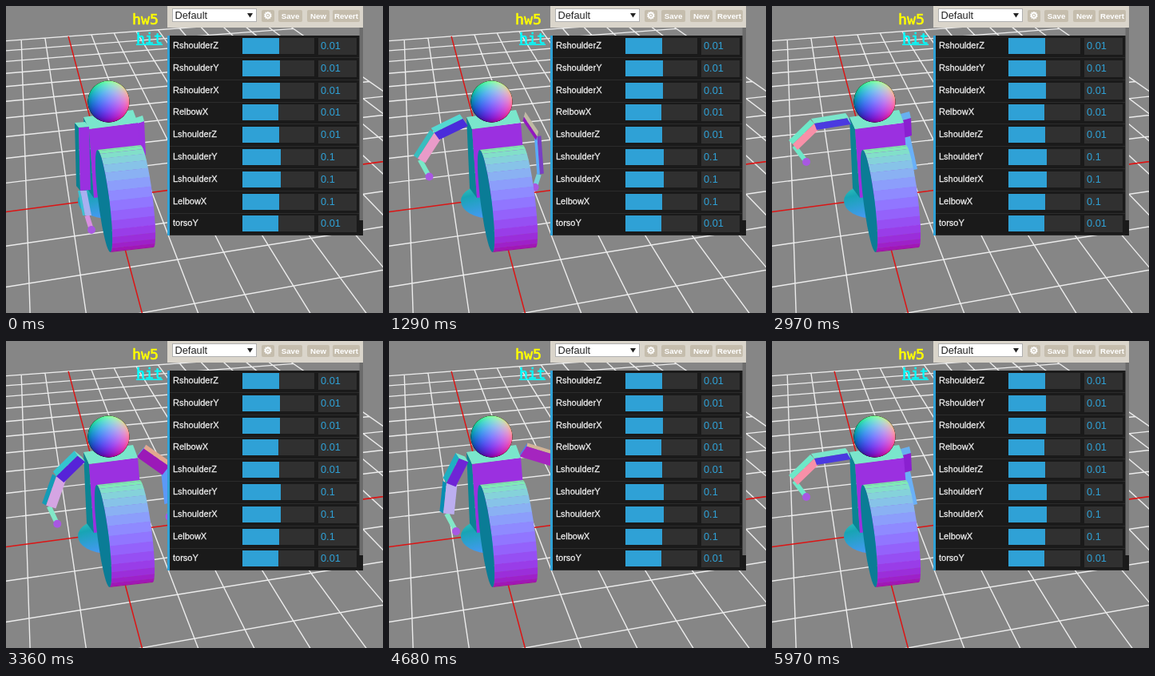
Animation, 472 px wide and 384 px high, one loop 6.33 s. Source, as an HTML page:

```html
<!DOCTYPE html>
<html lang="en">
<head>
<meta charset="utf-8">
<title>Robot controls</title>
<style>
html, body { margin: 0; width: 100%; height: 100%; overflow: hidden; background: #868686; }
svg { display: block; width: 472px; height: 384px; }
text { font-family: "Liberation Sans", sans-serif; }
.mono { font-family: "DejaVu Sans Mono", monospace; font-size: 18.3px; stroke-width: .6px; }
.head { isolation: isolate; }
.head circle { mix-blend-mode: screen; }
</style>
</head>
<body>
<svg id="stage" viewBox="0 0 472 384">
  <defs>
    <linearGradient id="r"><stop stop-color="#000"/><stop offset="1" stop-color="#f00"/></linearGradient>
    <linearGradient id="g" x2="0" y2="1"><stop stop-color="#0f0"/><stop offset="1" stop-color="#000"/></linearGradient>
    <radialGradient id="b">
      <stop stop-color="#00f"/><stop offset=".5" stop-color="#0000ee"/><stop offset=".8" stop-color="#0000cc"/>
      <stop offset=".95" stop-color="#0000a8"/><stop offset="1" stop-color="#000080"/>
    </radialGradient>
    <linearGradient id="hip" x2=".45" y2="1">
      <stop stop-color="#3cd0c0"/><stop offset=".35" stop-color="#18a4b4"/><stop offset="1" stop-color="#4a98fa"/>
    </linearGradient>
  </defs>
  <rect width="472" height="384" fill="#868686"/>
  <g id="grid" fill="none"></g>
  <ellipse cx="128" cy="244" rx="38" ry="22" fill="url(#hip)"/>
  <g id="right"></g>
  <g id="torso">
    <path fill="#0a8494" d="M97 139L104 154L110 240L101 228Z"/>
    <path fill="#9b30e0" d="M104 154L165 146L172 232L110 240Z"/>
    <path fill="#7ae6cc" d="M97 139L159 130L165 146L104 154Z"/>
  </g>
  <g id="shield"></g>
  <g id="left"></g>
  <g class="head">
    <circle cx="128.5" cy="119.500" r="26" fill="url(#r)"/>
    <circle cx="128.5" cy="119.500" r="26" fill="url(#g)"/>
    <circle cx="128.5" cy="119.500" r="26" fill="url(#b)"/>
  </g>
  <text class="mono" x="158" y="22.500" fill="#ff0" stroke="#ff0">hw5</text>
  <text class="mono" x="163" y="46.500" fill="#0ff" stroke="#0ff">hit</text>
  <rect x="163" y="47.500" width="33" height="1.500" fill="#0ff"/>
  <g id="panel"></g>
</svg>
<script>
const el = id => document.getElementById(id);
const LOOP = 6330, STEP = 30;

// Ground plane: u runs away from the viewer, v to the right.
function ground(u, v) {
  const a = 0.0802 * u, b = 0.0151 * v, w = 1 + a + b;
  return [(132 + 11 * a + 3537 * b) / w, (240 - 214 * a - 214 * b) / w].map(n => n.toFixed(1));
}

function drawGrid() {
  const half = 10;
  let white = '', red = '';
  for (let i = -half; i <= half; i++) {
    const row = `M${ground(i, -half)}L${ground(i, half)}`;
    const col = `M${ground(-half, i)}L${ground(half, i)}`;
    if (i) white += row + col; else red = row + col;
  }
  el('grid').innerHTML = `<path d="${white}" stroke="#ececec" stroke-width="1.4"/>` +
    `<path d="${red}" stroke="#dc1414" stroke-width="1.5"/>`;
}

// Short cylinder: a slim tilted end cap and flat shaded strips.
function drawShield() {
  const rim = (deg, dx, dy) => {
    const a = deg * Math.PI / 180;
    return `${(121.5 + dx - 8 * Math.cos(a) + 7 * Math.sin(a)).toFixed(1)},${(244 + dy - 64 * Math.cos(a)).toFixed(1)}`;
  };
  const n = 16, size = 180 / n;
  let out = '', cap = '';
  for (let i = 0; i < n; i++) {
    const p = i * size, q = p + size + 0.4;
    const f = (75 - 150 * i / (n - 1)) * Math.PI / 180;
    const rgb = [125 + 2.5 * i, 128 + 116 * Math.sin(f), 128 + 127 * Math.cos(f)].map(Math.round);
    out += `<polygon fill="rgb(${rgb})" points="${rim(p, 0, 0)} ${rim(p, 54, -6)} ${rim(q, 54, -6)} ${rim(q, 0, 0)}"/>`;
  }
  for (let d = 0; d < 360; d += 10) cap += rim(d, 0, 0) + ' ';
  el('shield').innerHTML = out + `<polygon fill="#0a7c96" points="${cap}"/>`;
}

function drawPanel() {
  const rect = (x, y, w, h, fill, more = '') =>
    `<rect x="${x}" y="${y}" width="${w}" height="${h}" fill="${fill}" ${more}/>`;
  const text = (x, y, size, fill, s, more = '') =>
    `<text x="${x}" y="${y}" font-size="${size}" fill="${fill}" ${more}>${s}</text>`;
  let out = rect(202, 0, 245, 27, '#dad5cb') +
    rect(208.5, 3.5, 105, 16, '#fff', 'stroke="#b0b0b0"') +
    text(211.5, 15.5, 12.8, '#222', 'Default') +
    '<path d="M302 9h7l-3.500 5.500z" fill="#222"/>';
  for (const [x, w, s] of [[320, 16, '⚙'], [341, 30, 'Save'], [377, 28, 'New'], [409, 34, 'Revert']]) {
    const gear = s === '⚙';
    const font = gear ? 'stroke="#fff" stroke-width=".7" style="font-family:\'DejaVu Sans\',sans-serif"' : 'font-weight="bold"';
    out += rect(x, 5, w, 15, '#c5bdad', 'rx="2"') +
      text(x + w / 2, 16, gear ? 12 : 9.7, '#fff', s, 'text-anchor="middle" ' + font);
  }
  out += rect(202, 37, 245, 250, '#1a1a1a') + rect(202, 37, 3, 250, '#2fa1d6') +
    rect(442.5, 27, 4.5, 241, '#6c6c6c');
  const rows = [
    ['RshoulderZ', 46, 0.01], ['RshoulderY', 47, 0.01], ['RshoulderX', 47, 0.01],
    ['RelbowX', 45, 0.01], ['LshoulderZ', 46, 0.01], ['LshoulderY', 48, 0.1],
    ['LshoulderX', 48, 0.1], ['LelbowX', 46, 0.1], ['torsoY', 45, 0.01]
  ];
  rows.forEach(([name, fill, value], i) => {
    const y = 37 + Math.round(i * 27.8);
    out += rect(205, y + 27, 237, 1, '#2c2c2c') +
      text(209, y + 16, 11, '#eee', name, 'stroke="#eee" stroke-width=".3"') +
      rect(296, y + 3, 90, 20, '#303030') + rect(296, y + 3, fill, 20, '#2fa1d6') +
      rect(391, y + 3, 48, 21, '#303030') + text(394, y + 17, 12.8, '#2fa1d6', value);
  });
  el('panel').innerHTML = out;
}

// Pose: shoulder, elbow, wrist, hand, then two side offsets for each limb.
// Colours: upper sides, lower sides, top cap, stick.
const pose = (pts, cols) => ({
  pts, cols: cols.split(' ').map(c => [0, 2, 4].map(i => parseInt(c.slice(i, i + 2), 16)))
});
const arms = {
  left: {
    rest: pose([91, 152, 93, 231, 99, 262, 107, 280, -5, -6, 13, -1, -3, 0, 8, 0],
      '0a8090 9a30e0 40c0d0 a8b0f0 7ae6cc d890e0'),
    keys: [
      pose([87, 152, 85, 184, 92, 220, 113, 241, -5, -8, 13, -2, -4, -3, 13, -2],
        '1590a8 9a30d8 1a90b0 9cb4f0 7ae6cc 80e8c8'),
      pose([90, 143, 62, 168, 48, 204, 62, 227, -4, -6, 9, 8, -5, -3, 12, 4],
        '38c8d0 5424d8 18a0b8 d8a4e0 7ae6cc 80e8c8'),
      pose([96, 140, 53, 147, 26, 173, 43, 195, -4, -6, 3, 8, -5, -5, 6, 7],
        '7ae6cc 4a3ae0 6ee8c8 f890a8 7ae6cc 6ee8c8')
    ]
  },
  right: {
    rest: pose([161, 148, 163, 190, 160, 225, 150, 240, -2, -7, 12, -4, -2, 0, 9, -2],
      '1090a8 9a30e0 1090a8 9a30e0 7ae6cc 80e8c8'),
    keys: [
      pose([168, 130, 225, 127, 260, 125, 280, 130, -5, -4, 0, 11, -3, -5, 0, 11],
        '80e8c8 b040d8 80e8c8 b040d8 3a50e0 80e8c8'),
      pose([172, 135, 202, 158, 206, 203, 201, 222, 3, -5, -8, 10, 8, -2, -10, 3],
        'e0a890 9a18b8 9a18b8 5a9cf8 5a9cf8 80e8c8'),
      pose([163, 143, 164, 165, 173, 206, 170, 215, -2, -8, 11, -3, -2, 0, 9, -2],
        '7ae0d0 8a20d0 40a8d8 6ab0f8 68b0f0 6ab0f8')
    ]
  }
};

// Smooth curve through the three key poses at 0, M and 1.
const M = 0.57;
function blend(keys, p) {
  const k = [(p - M) * (p - 1) / M, p * (p - 1) / (M * (M - 1)), p * (p - M) / (1 - M)];
  const mix = (a, b, c) => a * k[0] + b * k[1] + c * k[2];
  const [a, b, c] = keys;
  return {
    pts: a.pts.map((v, i) => mix(v, b.pts[i], c.pts[i])),
    cols: a.cols.map((col, i) => col.map((v, j) => mix(v, b.cols[i][j], c.cols[i][j])))
  };
}

function drawArm(id, { pts, cols }) {
  const v = [];
  for (let i = 0; i < 16; i += 2) v.push([pts[i], pts[i + 1]]);
  const [s, e, w, h, u1, u2, l1, l2] = v;
  const fill = cols.map(c => `rgb(${c.map(n => Math.round(Math.max(0, Math.min(255, n))))})`);
  const add = (a, b) => [a[0] + b[0], a[1] + b[1]];
  const poly = (f, ...p) =>
    `<polygon fill="${f}" points="${p.map(q => q.map(n => n.toFixed(2))).join(' ')}"/>`;
  const side = (a, b, d, f) => poly(f, a, b, add(b, d), add(a, d));
  const from = add(w, [l2[0] * 0.3, l2[1] * 0.3]);
  el(id).innerHTML =
    `<path d="M${from}L${h}" stroke="${fill[5]}" stroke-width="6"/>` +
    `<circle cx="${h[0]}" cy="${h[1]}" r="5" fill="#a858e2"/>` +
    side(e, w, l1, fill[2]) + side(e, w, l2, fill[3]) +
    side(s, e, u1, fill[0]) + side(s, e, u2, fill[1]) +
    poly(fill[4], s, add(s, u1), add(add(s, u1), u2), add(s, u2));
}

// Arm swing: 1 is the left arm raised, 0 the right arm raised.
function swing(t) {
  const ramp = (a, b) => Math.max(0, Math.min(1, (t - a) / (b - a)));
  if (t < 2970) return 0.583 + 0.417 * ramp(930, 1680);
  if (t < 4170) return 1 - ramp(2970, 3810);
  return ramp(4170, 5970);
}

function render(ms) {
  const t = Math.floor(ms % LOOP / STEP) * STEP, resting = t < 930;
  for (const id in arms) drawArm(id, resting ? arms[id].rest : blend(arms[id].keys, swing(t)));
  el('shield').setAttribute('transform', `translate(${resting ? 1 : 0})`);
}

drawGrid();
drawShield();
drawPanel();
const start = performance.now();
function tick() {
  render(performance.now() - start);
  requestAnimationFrame(tick);
}
tick();
</script>
</body>
</html>
```
